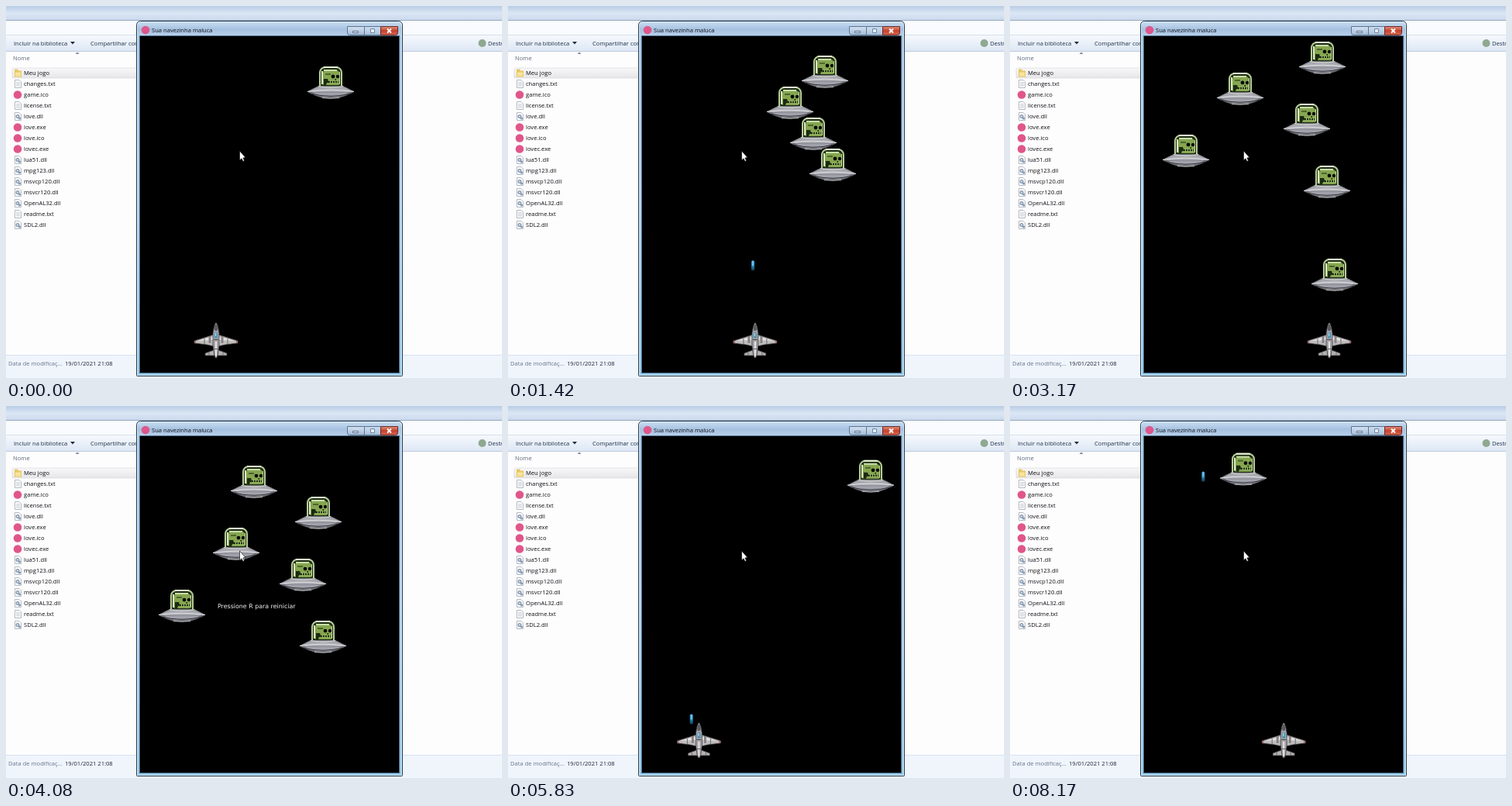
These frames come from a looping animation (640 px wide and 480 px high, 8.26 s). An HTML page with a canvas:

```html
<!DOCTYPE html>
<html lang="pt">
<head>
<meta charset="utf-8">
<style>
html, body { margin: 0; width: 100%; height: 100%; overflow: hidden; background: #fdfdfe; }
canvas { display: block; }
</style>
</head>
<body>
<canvas id="stage" width="640" height="480"></canvas>
<script>
const c = document.getElementById('stage').getContext('2d');
const LOOP = 8260, FPS = 12, RESTART = 5420;
const UI = '"Open Sans", "Noto Sans", sans-serif';

// Speeds in px/ms, sizes in px
const PILOT_SPEED = 0.33, SHOT_SPEED = 0.395, SHOT_GAP = 205;
const ROW = 40, FOE_H = 42, TOP = 40.3, PLANE_Y = 409, HOME = 271;

// scroll: [ms, px] of the lowest foe; moves: [ms, goal]; volleys: [ms, shots]
const rounds = [
  {
    start: 0, end: RESTART,
    scroll: [[0, 78], [1417, 184], [3167, 326], [4083, 397], [5083, 480]],
    moves: [[1075, 316], [1408, 378], [2140, 412]],
    volleys: [[1212, 1], [1520, 2]],
    foes: [419, 394, 364, 409, 227, 383, 297, 403, 320, 359, 236, 330]
  },
  {
    start: RESTART, end: LOOP,
    scroll: [[RESTART, 36], [6667, 138]],
    moves: [[5696, 236], [5802, 478], [6652, 201.5], [7707, 478]],
    volleys: [[5804, 5], [6935, 3]],
    foes: [468, 395, 240, 395, 310, 301]
  }
];

// Linear between key points, the last slope goes on.
function at(keys, t) {
  let i = 1;
  while (i < keys.length - 1 && t > keys[i][0]) i++;
  const [a, u] = keys[i - 1], [b, v] = keys[i];
  return u + (v - u) * (t - a) / (b - a);
}

function pilotX(g, t) {
  let x = HOME;
  g.moves.forEach(([from, goal], i) => {
    const next = g.moves[i + 1] ? g.moves[i + 1][0] : g.end;
    const reach = Math.max(0, Math.min(t, next) - from) * PILOT_SPEED;
    x += Math.max(-reach, Math.min(reach, goal - x));
  });
  return x;
}

const foeY = (g, k, t) => at(g.scroll, t) - ROW * k;
const shotY = (s, t) => PLANE_Y - SHOT_SPEED * (t - s.start);

// Plays a round once to find what hits what, and when.
function play(g) {
  g.crash = g.end;
  g.foes = g.foes.map(x => ({ x, end: g.end }));
  g.shots = g.volleys.flatMap(([from, count]) => Array.from({ length: count }, (_, i) => {
    const start = from + i * SHOT_GAP;
    return { start, x: pilotX(g, start), end: g.end };
  }));
  for (let t = g.start; t < g.end; t += 5) {
    g.foes.forEach((foe, k) => {
      const y = foeY(g, k, t);
      if (foe.end <= t || y < TOP) return;
      const hit = g.shots.find(s => s.start <= t && s.end > t && Math.abs(s.x - foe.x) < 30 &&
        shotY(s, t) < y + FOE_H && shotY(s, t) > y);
      if (hit) hit.end = foe.end = t;
      if (t < g.crash && y + FOE_H > PLANE_Y && Math.abs(pilotX(g, t) - foe.x) < 56) g.crash = foe.end = t;
    });
  }
}
rounds.forEach(play);

function box(x, y, w, h, fill) {
  c.fillStyle = fill;
  c.fillRect(x, y, w, h);
}

function shade(y0, y1, ...stops) {
  const g = c.createLinearGradient(0, y0, 0, y1);
  stops.forEach((s, i) => g.addColorStop(i / (stops.length - 1), s));
  return g;
}

function paint(fill, line) {
  if (fill) { c.fillStyle = fill; c.fill(); }
  if (line) { c.strokeStyle = line; c.stroke(); }
}

function shape(pts, fill, line) {
  c.beginPath();
  for (let i = 0; i < pts.length; i += 2) c.lineTo(pts[i], pts[i + 1]);
  c.closePath();
  paint(fill, line);
}

// Right half of a symmetric outline, mirrored around x = 0.
function mirror(half, fill, line) {
  const pts = half.slice();
  for (let i = half.length - 2; i >= 0; i -= 2) pts.push(-half[i], half[i + 1]);
  shape(pts, fill, line);
}

function round(x, y, w, h, r, fill, line) {
  c.beginPath();
  c.roundRect(x, y, w, h, r);
  paint(fill, line);
}

function dot(x, y, r, fill) {
  c.beginPath();
  c.arc(x, y, r, 0, Math.PI * 2);
  paint(fill);
}

// Symmetric curve from (-w, y) over (0, mid) to (w, y).
function arc(w, y, mid, line) {
  c.beginPath();
  c.moveTo(-w, y);
  c.quadraticCurveTo(0, mid, w, y);
  paint(null, line);
}

function text(s, x, y, fill = '#101014', size = 7.6, font = UI) {
  c.font = size + 'px ' + font;
  c.fillStyle = fill;
  c.fillText(s, x, y);
}

function fileIcon(name, y) {
  if (!name.includes('.')) {
    shape([11, y - 5, 15, y - 5, 16, y - 3, 20, y - 3, 20, y + 5, 11, y + 5], '#e8c860');
    box(12, y - 1, 7, 5, '#f8e498');
  } else if (/ico|exe/.test(name)) {
    dot(15, y, 5.3, '#e0568a');
  } else {
    c.lineWidth = 0.8;
    shape([11.5, y - 5, 17, y - 5, 19.5, y - 2.5, 19.5, y + 5, 11.5, y + 5], '#fdfdfe', '#a3a9b2');
    if (name.endsWith('dll')) {
      dot(15, y, 2.5, '#8799ad');
      dot(15, y, 1, '#f0f3f8');
      dot(17.5, y + 2.5, 1.6, '#7c9cbd');
    } else {
      for (let i = -2; i < 4; i += 2) box(13, y + i, 5, 0.8, '#b4bac4');
    }
  }
}

function explorer() {
  box(0, 0, 640, 480, '#fdfdfe');
  box(0, 0, 640, 19, shade(0, 19, '#b9cde6', '#dbe6f4', '#c9d8ec'));
  box(0, 18, 640, 1, '#97a9bf');
  box(0, 19, 640, 19, '#f9fbfe');
  box(0, 37, 640, 1, '#d6dfec');
  box(0, 38, 640, 20, shade(38, 58, '#f6f9fd', '#dde7f4'));
  box(0, 58, 640, 1, '#bfcbdd');
  text('Incluir na biblioteca', 10, 50.5, '#1e2f4a');
  shape([83, 46, 89, 46, 86, 49.5], '#1e2f4a');
  text('Compartilhar com', 109, 50.5, '#1e2f4a');
  dot(614.5, 48, 5, '#8fa890');
  text('Destravar', 622, 51, '#1e2f4a');
  text('Nome', 9, 70, '#5a677c');
  shape([89.5, 62, 92, 59.5, 94.5, 62], '#76879c');

  round(8, 80, 172, 13, 1.5, shade(80, 93, '#f8f8f9', '#e6e6e9'), '#dadade');
  ['Meu jogo', 'changes.txt', 'game.ico', 'license.txt', 'love.dll', 'love.exe', 'love.ico',
    'lovec.exe', 'lua51.dll', 'mpg123.dll', 'msvcp120.dll', 'msvcr120.dll', 'OpenAL32.dll',
    'readme.txt', 'SDL2.dll'].forEach((name, i) => {
    const y = 86.5 + 14 * i;
    fileIcon(name, y);
    text(name, 23, y + 2.8);
  });

  box(0, 451, 640, 29, '#f0f5fc');
  box(0, 450, 640, 1, '#d9e3f0');
  text('Data de modificaç...', 3, 463.5, '#66738a');
  text('19/01/2021 21:08', 76, 463.5, '#1c2536');
}

function gameWindow() {
  c.lineWidth = 1;
  round(168.5, 19.5, 343, 458, [5, 5, 1, 1], shade(20, 478, '#a9c6e6', '#b6d3ee', '#93cbec'), '#2c3a4a');
  box(170, 21, 340, 18, shade(21, 39, '#c8dcf1', '#a5c1e0', '#b9d1ea'));
  round(169.5, 20.5, 341, 456, [4, 4, 0, 0], null, '#cfe8f8');
  box(172, 38, 336, 436, '#4d6a86');
  box(173, 39, 334, 434, '#000');
  dot(180, 31, 5.3, '#e0568a');
  text('Sua navezinha maluca', 188, 34);

  const edge = '#5d7590';
  round(440.5, 26.5, 22, 11, [0, 0, 0, 3], shade(26, 38, '#d7e4f3', '#9fb9d6'), edge);
  round(462.5, 26.5, 21, 11, 0, shade(26, 38, '#cfdef0', '#a9c1dc'), edge);
  round(483.5, 26.5, 22, 11, [0, 0, 3, 0], shade(26, 38, '#e39a88', '#c5402c', '#d9705a'), '#6a2a26');
  round(447.5, 32.5, 7, 2, 0, '#ffffff', '#5b6c82');
  round(470.5, 29.5, 5, 5, 0, '#e3ecf6', '#72869e');
  c.lineWidth = 1.8;
  c.strokeStyle = '#ffffff';
  c.beginPath();
  c.moveTo(492, 29.5); c.lineTo(497, 34.5);
  c.moveTo(497, 29.5); c.lineTo(492, 34.5);
  c.stroke();
}

function saucer(x, y) {
  c.save();
  c.translate(x, y);
  // dome and pilot
  c.lineWidth = 2;
  round(-14, 1, 28, 27, [7, 7, 0, 0], '#1d2b14', '#b6cf96');
  box(-9, 0, 18, 2, '#e6f0d4');
  round(-10, 5, 21, 19, [4, 4, 1, 1], '#86a650');
  box(-9, 4, 17, 2, '#c9deaa');
  box(-12, 6, 2, 17, '#dcebc6');
  box(11, 7, 1, 16, '#c0d6a2');
  box(-7, 9, 7, 2, '#4c6630');
  dot(3, 13, 2.4, '#060a04');
  dot(9, 13, 2.2, '#060a04');
  box(5.5, 16, 1.5, 2, '#1a2710');
  shape([-9, 16, -4, 16, -3, 19, 10, 19, 10, 21, -5, 21, -6, 24, -9, 24], '#1c2a12');
  for (let i = -1; i < 10; i += 3) box(i, 18, 1, 4, '#9fbe6c');
  // hull
  mirror([16, 25, 21, 27.5, 30, 32, 28, 34, 19, 38, 10, 41], '#6f7076');
  mirror([15, 26, 20, 28, 28, 32, 23, 33], '#a9aab0');
  mirror([24, 33.5, 17, 37, 9, 39], '#a2a2ac');
  c.lineWidth = 1;
  arc(30, 32.5, 28, '#e6e6ec');
  arc(16, 25.5, 29, '#d3d6d0');
  arc(26, 35, 41.5, '#34343a');
  arc(11, 40.5, 42, '#c4c4ca');
  c.restore();
}

function plane(x) {
  c.save();
  c.translate(x, PLANE_Y);
  c.lineWidth = 0.8;
  const dark = '#3f3d42';
  mirror([3, 15, 9, 17, 28, 23, 28, 26, 12, 28, 3, 30], '#bfbcbc', dark);
  mirror([3, 35, 14, 39, 14, 42, 3, 42], '#b5b2b3', dark);
  mirror([6, 18, 24, 23, 6, 22], '#e4e2e2');
  for (const s of [-1, 1]) {
    box(s * 27 - 1, 23, 2, 2.5, '#b0605a');
    box(s * 15 - 0.5, 20, 1, 7, '#6f6c70');
    box(s * 8 - 1.5, 17, 3, 9, '#868388');
    box(s * 9 - 0.5, 38, 1, 4, '#6f6c70');
  }
  mirror([0.7, 0, 2.5, 5, 4, 13, 4, 29, 2.5, 40, 1, 45], '#a3a1a5', dark);
  mirror([1, 2, 2.3, 7, 1.5, 10], '#5a5a60');
  box(-1, 24, 2, 19, '#e6e4e4');
  round(-2, 12, 4, 8, 2, '#4a94b8');
  box(-1, 13, 1.2, 4, '#b2dcf0');
  box(-3, 21, 6, 1, '#4a484e');
  box(-2.5, 33, 5, 1, '#605e64');
  c.restore();
}

function laser(x, y) {
  round(x - 2, y, 4, 13, [2, 2, 1, 1], shade(y, y + 13, '#3b9fe0', '#2d8fc0', '#123f58'));
  box(x - 0.8, y + 1, 1.6, 6, '#74c8f0');
}

function game(t) {
  const g = rounds.find(r => t < r.end);
  c.save();
  c.beginPath();
  c.rect(173, 39, 334, 434);
  c.clip();
  if (t >= g.crash) text('Pressione R para reiniciar', 273, 260.5, '#f4f4f6', 7.9, '"DejaVu Sans", sans-serif');
  for (const s of g.shots)
    if (t >= s.start && t < s.end) laser(s.x, shotY(s, t));
  if (t < g.crash) plane(pilotX(g, t));
  g.foes.forEach((foe, k) => {
    const y = foeY(g, k, t);
    if (y > TOP && t < foe.end) saucer(foe.x, y);
  });
  c.restore();
}

function cursor() {
  c.lineWidth = 0.7;
  shape([301.5, 187, 301.5, 199, 304, 196.8, 305.8, 200.5, 307.6, 199.6, 305.9, 196, 309, 195.5], '#ffffff', '#181818');
}

function draw(now) {
  const n = Math.floor((now % LOOP + 5) * FPS / 1000);
  const t = Math.min(n, 98) * 1000 / FPS;
  explorer();
  gameWindow();
  game(t);
  cursor();
}

let begin;
function tick(now) {
  begin ??= now;
  draw(now - begin);
  requestAnimationFrame(tick);
}
draw(0);
requestAnimationFrame(tick);
</script>
</body>
</html>
```
